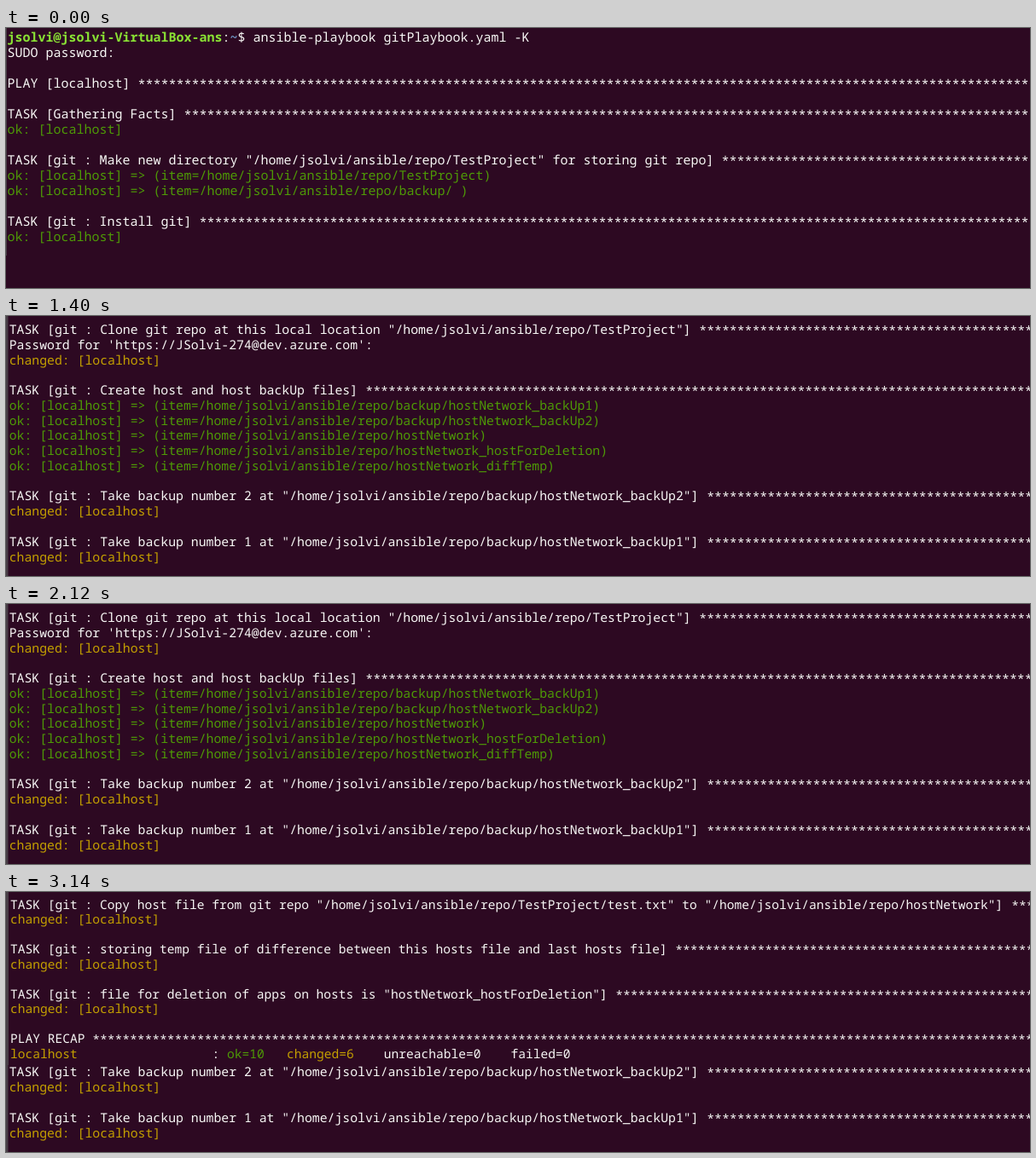
These frames come from a looping animation (1200x305 px, 3.5 s). An HTML page:

```html
<!DOCTYPE html>
<html lang="en">
<head>
<meta charset="utf-8">
<title>Playbook run</title>
<style>
  html, body { margin: 0; width: 100%; height: 100%; overflow: hidden; background: #2d0922; }
  svg { display: block; width: 1200px; height: 305px; }
  text { font-family: "Noto Sans Mono", "DejaVu Sans Mono", monospace; text-rendering: geometricPrecision; white-space: pre; }
</style>
</head>
<body>
<svg id="stage" viewBox="0 0 1200 305"></svg>
<script>
const LOOP = 3500;
const GLYPH_RATIO = 0.6; // advance width per em
const COLORS = { w: '#f8f8f6', g: '#4e9a06', y: '#c4a000', p: '#8ae234', b: '#729fcf' };
const USER = 'jsolvi';
const REPO = `/home/${USER}/ansible/repo`;
const BACKUP = `${REPO}/backup/hostNetwork_backUp`;
const stage = document.getElementById('stage');

function add(parent, tag, attrs, text = '') {
  const node = document.createElementNS('http://www.w3.org/2000/svg', tag);
  for (const [key, value] of Object.entries(attrs)) node.setAttribute(key, value);
  node.textContent = text;
  return parent.appendChild(node);
}

// A row is a list of [color key, text] spans; spans of asterisks run to the right edge.
const heading = title => [['w', title + ' '], ['w', '*']];
const task = title => heading(`TASK [${title}]`);
const line = (color, text) => [[color, text]];
const ok = (item = '') => line('g', 'ok: [localhost]' + (item && ` => (item=${item})`));
const changed = line('y', 'changed: [localhost]');
const gap = [];

function drawRows(parent, { x, y, advance, step }, rows) {
  rows.forEach((spans, row) => {
    let column = 0;
    for (const [color, content] of spans) {
      const stars = content === '*';
      const left = x + column * advance;
      const text = stars ? '*'.repeat(Math.ceil((1198 - left) / advance)) : content;
      add(parent, 'text', {
        x: left,
        y: y + row * step + (stars ? 1 : 0),
        fill: COLORS[color],
        'font-size': advance / GLYPH_RATIO,
        'font-weight': 'pb'.includes(color) ? 700 : 400
      }, text.replaceAll(' ', '\u00a0'));
      column += text.length;
    }
  });
}

function makeScreen(edgeWidth, edgeHeight) {
  const group = add(stage, 'g', {});
  add(group, 'rect', { width: 1200, height: 305, fill: '#2d0922' });
  add(group, 'rect', { width: edgeWidth, height: edgeHeight, fill: '#493e47' });
  return group;
}

const start = makeScreen(1, 267);
drawRows(start, { x: 1.5, y: 16, advance: 9, step: 18 }, [
  [['p', `${USER}@${USER}-VirtualBox-ans`], ['w', ':'], ['b', '~'], ['w', '$ ansible-playbook gitPlaybook.yaml -K']],
  line('w', 'SUDO password:'),
  gap,
  heading('PLAY [localhost]'),
  gap,
  task('Gathering Facts'),
  ok(),
  gap,
  task(`git : Make new directory "${REPO}/TestProject" for storing git repo`),
  ok(`${REPO}/TestProject`),
  ok(`${REPO}/backup/ `),
  gap,
  task('git : Install git'),
  ok()
]);

const middle = makeScreen(2.5, 305);
drawRows(middle, { x: 3.7, y: 21, advance: 8.886, step: 17.77 }, [
  task(`git : Clone git repo at this local location "${REPO}/TestProject"`),
  line('w', "Password for 'https://JSolvi-274@dev.azure.com':"),
  changed,
  gap,
  task('git : Create host and host backUp files'),
  ok(BACKUP + '1'),
  ok(BACKUP + '2'),
  ok(`${REPO}/hostNetwork`),
  ok(`${REPO}/hostNetwork_hostForDeletion`),
  ok(`${REPO}/hostNetwork_diffTemp`),
  gap,
  task(`git : Take backup number 2 at "${BACKUP}2"`),
  changed,
  gap,
  task(`git : Take backup number 1 at "${BACKUP}1"`),
  changed
]);

// The recap covers only the upper part, so the last tasks stay visible below it.
const recap = add(stage, 'g', {});
add(recap, 'rect', { width: 1200, height: 203, fill: '#2d0922' });
add(recap, 'rect', { width: 3, height: 203, fill: '#493e47' });
drawRows(recap, { x: 5, y: 19.7, advance: 8.756, step: 17.51 }, [
  task(`git : Copy host file from git repo "${REPO}/TestProject/test.txt" to "${REPO}/hostNetwork"`),
  changed,
  gap,
  task('git : storing temp file of difference between this hosts file and last hosts file'),
  changed,
  gap,
  task('git : file for deletion of apps on hosts is "hostNetwork_hostForDeletion"'),
  changed,
  gap,
  heading('PLAY RECAP'),
  [['y', 'localhost'.padEnd(27)], ['w', ': '], ['g', 'ok=10   '], ['y', 'changed=6    '], ['w', 'unreachable=0    failed=0']]
]);

function show(node, visible) {
  node.setAttribute('visibility', visible ? 'visible' : 'hidden');
}

function render(time) {
  const t = time % LOOP;
  show(start, t < 1400);
  show(middle, t >= 1400);
  show(recap, t >= 2600);
}

const origin = performance.now();
function tick() {
  render(performance.now() - origin);
  requestAnimationFrame(tick);
}
tick();
</script>
</body>
</html>
```
